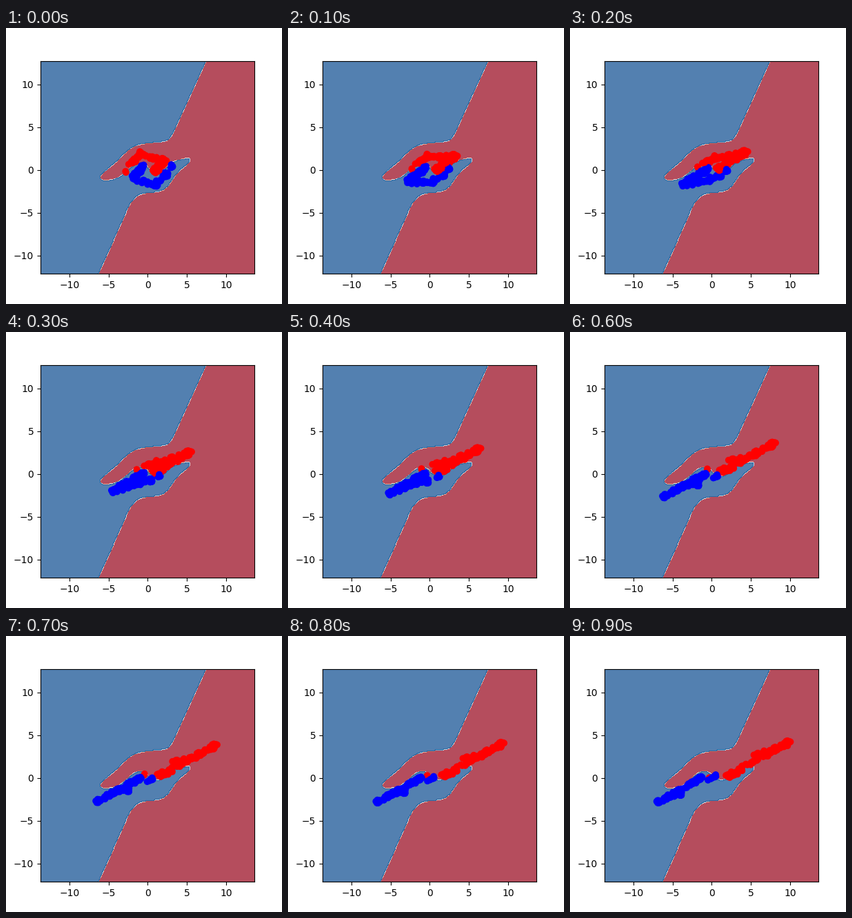
A matplotlib script that plays this animation: 400x400 px, repeating every 1000 ms.

```python
import numpy as np
import matplotlib.pyplot as plt
from matplotlib.animation import FuncAnimation
from matplotlib.path import Path

FRAMES = 10
XLIM, YLIM = (-13.69, 13.62), (-12.13, 12.73)
LEFT, TOP, WIDTH, HEIGHT = 50, 48, 310, 308  # plot area on the stage
CENTER = np.array([206, 204])  # the blue moon mirrors the red one here

# Control points of the class boundary, from the top edge to the bottom edge
BOUNDARY = [
    (293, 40), (243, 149), (236, 162), (222, 165), (198, 166.5), (179, 173),
    (158, 195), (135, 213), (137, 221), (155, 220), (170, 212), (185, 197),
    (200, 195), (209, 207), (226, 209), (240, 193), (256, 190), (266, 187),
    (266, 194), (247, 209), (231, 234), (213, 238), (194, 239), (180, 251),
    (169, 277), (127, 370),
]

# Key points along the red moon: pose at the start, halfway and at the end
MOON = np.array([
    [(172, 209), (193, 199), (197, 208)],  # lone end
    [(177, 200), (213, 190), (266, 172)],  # arm
    [(195, 180), (233, 188), (282, 169)],  # apex
    [(229, 193), (281, 167), (316, 154)],  # tip
    [(221, 199), (233, 194), (251, 189)],  # hook corner
    [(214, 208), (214, 202), (226, 204)],  # hook end
], float)


def to_data(px):
    """Stage pixels (y down) to data coordinates."""
    px = np.asarray(px, float) + 0.5
    x = XLIM[0] + (px[..., 0] - LEFT) * (XLIM[1] - XLIM[0]) / WIDTH
    y = YLIM[1] - (px[..., 1] - TOP) * (YLIM[1] - YLIM[0]) / HEIGHT
    return np.stack([x, y], axis=-1)


def smooth(points, rounds=3):
    """Round a polyline by repeated corner cutting."""
    p = np.array(points, float)
    for _ in range(rounds):
        a, b = p[:-1], p[1:]
        cuts = np.stack([0.75 * a + 0.25 * b, 0.25 * a + 0.75 * b], axis=1)
        p = np.vstack([p[:1], cuts.reshape(-1, 2), p[-1:]])
    return p


rng = np.random.default_rng(4)


def make_moon(lone_count, lone_reach, count=110):
    """Place along the moon (0 to 5) and jitter of every dot."""
    place = np.concatenate([rng.uniform(0, lone_reach, lone_count),
                            rng.uniform(1, 5, count)])
    jitter = np.clip(rng.normal(0, 1.8, (len(place), 2)), -3.5, 3.5)
    jitter[:lone_count] *= 0.5
    return place, jitter


def moon_at(u, place, jitter):
    """Dots of the red moon at progress u, in stage pixels."""
    weights = [(1 - 2 * u) * (1 - u), 4 * u * (1 - u), u * (2 * u - 1)]
    knots = np.einsum("kpc,p->kc", MOON, weights)
    steps = np.arange(len(knots))
    line = [np.interp(place, steps, knots[:, c]) for c in (0, 1)]
    return np.column_stack(line) + jitter


red = make_moon(lone_count=2, lone_reach=0.06)
blue = make_moon(lone_count=12, lone_reach=0.32)
colors = np.array(["red"] * len(red[0]) + ["blue"] * len(blue[0]))
order = rng.permutation(len(colors))


def positions(frame):
    u = frame / (FRAMES - 1)
    mirrored = CENTER - (1 - 0.26 * u) * (moon_at(u, *blue) - CENTER)
    return to_data(np.vstack([moon_at(u, *red), mirrored]))[order]


fig = plt.figure(figsize=(4, 4), dpi=100)
ax = fig.add_axes([0.125, 0.11, 0.775, 0.77])

xx, yy = np.meshgrid(np.arange(-13.8, 13.8, 0.1), np.arange(-12.3, 12.9, 0.1))
outline = np.vstack([smooth(BOUNDARY), [(380, 370), (380, 40)]])
inside = Path(to_data(outline)).contains_points(
    np.column_stack([xx.ravel(), yy.ravel()]))
label = np.where(inside, 0.0, 1.0).reshape(xx.shape)
ax.contourf(xx, yy, label, levels=np.arange(8) * 0.15, cmap="RdBu", alpha=0.75)

dots = ax.scatter(*positions(0).T, c=colors[order], s=36)
ax.set(xlim=XLIM, ylim=YLIM,
       xticks=range(-10, 11, 5), yticks=range(-10, 11, 5))


def update(frame):
    dots.set_offsets(positions(frame))
    return (dots,)


anim = FuncAnimation(fig, update, frames=FRAMES, interval=100,
                     repeat=True, repeat_delay=0)
plt.show()
```
